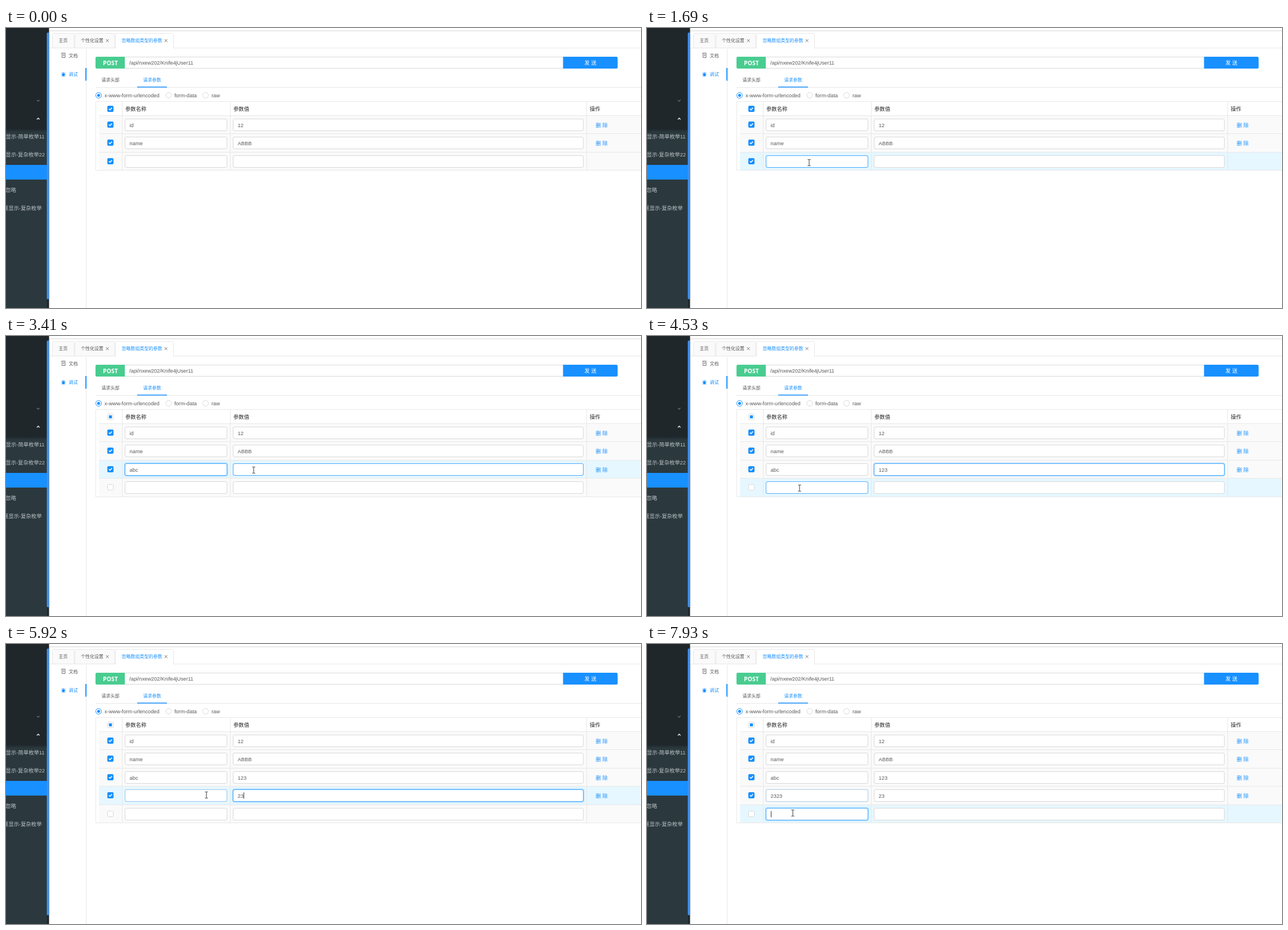
These frames come from a looping animation (1128 px wide and 497 px high, 8000 ms). An HTML page:

```html
<!DOCTYPE html>
<html lang="zh-CN">
<head>
<meta charset="utf-8">
<title>请求参数</title>
<style>
html, body { margin: 0; height: 100%; overflow: hidden; background: #fff; }
svg { display: block; width: 100vw; height: 100vh; }
text { font: 9.33px "Liberation Sans", "Noto Sans CJK SC", "Noto Sans CJK", sans-serif; fill: #595959; white-space: pre; }
.small { font-size: 8px; }
.url { font-size: 9.2px; }
.dark { fill: #262626; }
.blue { fill: #1890ff; }
.white { fill: #fff; }
.side { fill: #bcc2c4; text-anchor: end; }
.method { font: 700 10.3px "Open Sans", sans-serif; fill: #fff; text-anchor: middle; }
.rule { fill: none; stroke: #e8e8e8; }
.field { fill: #fff; stroke: #d9d9d9; }
.edge { fill: none; stroke: #40a9ff; }
.glow { fill: none; stroke: #1890ff; stroke-opacity: .25; stroke-width: 1.5; }
.tab { fill: #fafafa; stroke: #e8e8e8; }
.icon { fill: none; stroke: #666; stroke-width: .9; }
.box { fill: #fff; stroke: #d9d9d9; }
.on .box { fill: #1890ff; stroke: #1890ff; }
.tick { fill: none; stroke: #fff; stroke-width: 1.5; visibility: hidden; }
.on .tick { visibility: inherit; }
.dash { fill: #1890ff; visibility: hidden; }
.part .dash { visibility: inherit; }
</style>
</head>
<body>
<svg viewBox="0 0 1128 497" preserveAspectRatio="none">
  <defs>
    <linearGradient id="shade" x2="0" y2="1">
      <stop offset="0" stop-opacity=".35"/>
      <stop offset="1" stop-opacity="0"/>
    </linearGradient>
    <g id="check">
      <rect class="box" x="-5" y="-5" width="10" height="10" rx="1.2"/>
      <path class="tick" d="M-2.7 0 -.8 2 2.8 -2.1"/>
      <rect class="dash" x="-2.7" y="-2.7" width="5.4" height="5.4"/>
    </g>
  </defs>

  <!-- side menu -->
  <rect width="76.5" height="497" fill="#1f272b"/>
  <rect y="178" width="73" height="319" fill="#2b393f"/>
  <rect y="178" width="73" height="7" fill="url(#shade)"/>
  <rect y="243" width="73" height="26" fill="#1890ff"/>
  <rect x="72.5" y="8" width="4" height="473.5" rx="2" fill="#4091f0"/>
  <path d="M54.8 127.8l2.4 2.4 2.4-2.4" fill="none" stroke="#a0a6a8"/>
  <path d="M54.8 162.4l2.4-2.4 2.4 2.4" fill="none" stroke="#fff" stroke-width="1.3"/>
  <text class="side" x="68.5" y="196">显示-简单枚举11</text>
  <text class="side" x="69" y="228">显示-复杂枚举22</text>
  <text class="side" x="18" y="291">忽略</text>
  <text class="side" x="63.5" y="323">框显示-复杂枚举</text>

  <!-- page tabs -->
  <rect x="77" y="4" width="1051" height="2" fill="#e9e9e9"/>
  <path class="rule" d="M77 35.5H1128"/>
  <path class="tab" d="M82.5 35.5V12.5q0-3 3-3H118q3 0 3 3V35.5z"/>
  <path class="tab" d="M122.5 35.5V12.5q0-3 3-3H190q3 0 3 3V35.5z"/>
  <path d="M194.5 36V12.5q0-3 3-3H294.5q3 0 3 3V36" fill="#fff" stroke="#e8e8e8"/>
  <text class="small" x="93.5" y="25">主页</text>
  <text class="small" x="133" y="25">个性化设置</text>
  <text class="small blue" x="205.5" y="25">忽略数组类型的参数</text>
  <path class="icon" d="M177.6 19.9l5 5m0-5-5 5M281.6 19.9l5 5m0-5-5 5"/>

  <!-- doc / debug menu -->
  <path class="rule" d="M142.5 37V497"/>
  <rect x="141" y="71" width="2" height="22.5" fill="#1890ff"/>
  <path class="icon" d="M99.5 45V52.5H105V44.5H98.5M101 47H103.8M101 49H103.8"/>
  <g stroke="#1890ff" stroke-width=".9" fill="none">
    <ellipse cx="102" cy="83" rx="2" ry="2.6" fill="#1890ff"/>
    <path d="M100.3 80q1.7-3 3.4 0M98.3 82.7H105.7M98.7 79.3l1.6 1.7M105.3 79.3l-1.6 1.7M98.7 86l1.6-1.5M105.3 86l-1.6-1.5"/>
  </g>
  <text class="small" x="111.5" y="51.5">文档</text>
  <text class="small blue" x="111.5" y="85">调试</text>

  <!-- address line -->
  <rect class="field" x="200.5" y="51.5" width="800" height="20"/>
  <path d="M211 51H161.5q-2.5 0-2.5 2.5V69.5q0 2.5 2.5 2.5H211z" fill="#49cc90"/>
  <path d="M989.5 51H1084q2.5 0 2.5 2.5V69.5q0 2.5-2.5 2.5H989.5z" fill="#1890ff"/>
  <text class="method" x="185.5" y="65.5">POST</text>
  <text class="url" x="219" y="65">/api/nxew202/Knife4jUser11</text>
  <text class="white" x="1027.5" y="65">发 送</text>

  <!-- request tabs -->
  <path class="rule" d="M159 105.5H1128"/>
  <rect x="233" y="104" width="53" height="1.5" fill="#1890ff"/>
  <text class="small" x="169.5" y="95">请求头部</text>
  <text class="small blue" x="243.5" y="95">请求参数</text>

  <!-- body type -->
  <circle cx="164.5" cy="119.5" r="5" fill="#fff" stroke="#1890ff"/>
  <circle cx="164.5" cy="119.5" r="2.6" fill="#1890ff"/>
  <circle class="field" cx="289" cy="119.5" r="5"/>
  <circle class="field" cx="354.5" cy="119.5" r="5"/>
  <text class="url" x="175" y="122.5">x-www-form-urlencoded</text>
  <text x="299" y="122.5">form-data</text>
  <text x="365" y="122.5">raw</text>

  <!-- table -->
  <path class="rule" d="M1128 130.5H159.5V155.5M206.5 130V155.5M398.5 130V155.5M1031.5 130V155.5M165 155.5H1128"/>
  <g id="master" transform="translate(185.5 143.5)"></g>
  <text class="dark" x="212" y="146.5">参数名称</text>
  <text class="dark" x="404" y="146.5">参数值</text>
  <text class="dark" x="1037" y="146.5">操作</text>
  <g id="body"></g>
  <path id="foot" class="rule" d="M159 0H166"/>

  <rect id="caret" width="1" height="11" fill="#333" visibility="hidden"/>
  <path id="arrow" d="M.5 .5V11.3L3 9 4.7 12.7 6.5 11.9 4.8 8.3H8z" fill="#fff" stroke="#222" stroke-width=".9" visibility="hidden"/>
  <path id="beam" d="M-2.5 -5.5H-.6L0 -5 .6 -5.5H2.5M0 -5V5M-2.5 5.5H-.6L0 5 .6 5.5H2.5" fill="none" stroke="#333" visibility="hidden"/>
</svg>
<script>
const LOOP = 8000, FADE = 300, BLINK = 500;
const $ = id => document.getElementById(id);

// pointer path: time, x, y
const route = [
  [130, 1059, 486], [430, 850, 252], [560, 670, 206], [680, 530, 207],
  [740, 470, 226], [830, 401, 249.5], [930, 352, 240], [1020, 352, 240],
  [1650, 288, 239], [2800, 288, 239], [3100, 392, 234], [3420, 441, 238],
  [4090, 441, 238], [4500, 270.5, 270], [4900, 270.5, 270], [5380, 430, 268],
  [5780, 430, 268], [5920, 356, 268], [6240, 288, 268], [7000, 288, 268],
  [7160, 286, 289], [7320, 279, 299], [7600, 259, 300], [LOOP, 259, 300]
];

// clicks into a field: time, row, column
const clicks = [[1720, 2, 0], [3530, 2, 1], [5450, 3, 1], [6300, 3, 0], [7770, 4, 0]];

// typing: text and the time of each key
const preset = { '0,0': 'id', '0,1': '12', '1,0': 'name', '1,1': 'ABBB' };
const typed = {
  '2,0': ['abc', [2240, 2400, 2630]],
  '2,1': ['123', [3870, 3950, 4020]],
  '3,0': ['2323', [6450, 6530, 6780, 6850]],
  '3,1': ['23', [5660, 5750]]
};
const keyTimes = Object.values(typed).flatMap(k => k[1]);

const shownAt = [0, 0, 0, 2240, 5660];
const checkedAt = [0, 0, 0, 5750, Infinity];
const deleteAt = [0, 0, 2240, 5750, Infinity];

const columns = [{ x: 211.5, w: 181 }, { x: 403.5, w: 622 }];
const rowTop = i => Math.round(155 + 32.4 * i) + 0.5;

const checkShape = $('check').innerHTML;
$('master').innerHTML = checkShape;

function fieldMarkup({ x, w }, y) {
  const size = `x="${x}" y="${y}" width="${w}" height="21"`;
  return `<rect class="field" ${size} rx="2.5"/>
    <rect class="glow" x="${x - 1.2}" y="${y - 1.2}" width="${w + 2.4}" height="23.4" rx="3.5"/>
    <rect class="edge" ${size} rx="2.5"/>
    <text class="value" x="${x + 8}" y="${y + 14}"></text>`;
}

const rows = shownAt.map((_, i) => {
  const y = rowTop(i), end = rowTop(i + 1), mid = y + 16.5;
  const g = document.createElementNS('http://www.w3.org/2000/svg', 'g');
  g.innerHTML = `<rect x="165" y="${y}" width="962" height="${end - y}" fill="#fafafa"/>
    <rect class="tint" x="165" y="${y}" width="962" height="${end - y}" fill="#e6f7ff"/>
    <path class="rule" d="M159.5 ${y}V${end}M206.5 ${y}V${end}M398.5 ${y}V${end}M1031.5 ${y}V${end}M165 ${y}H1128M165 ${end}H1128"/>
    <g class="pick" transform="translate(185.5 ${mid - 0.5})">${checkShape}</g>
    ${columns.map(c => fieldMarkup(c, y + 6)).join('')}
    <text class="blue delete" x="1047.5" y="${mid + 3.5}">删 除</text>`;
  $('body').append(g);
  const all = s => [...g.querySelectorAll(s)];
  return {
    g, tint: all('.tint')[0], pick: all('.pick')[0], del: all('.delete')[0],
    edges: all('.edge'), glows: all('.glow'), values: all('.value')
  };
});

function pointer(t) {
  if (t < route[0][0]) return null;
  const n = route.findIndex(p => p[0] > t);
  const [t0, x0, y0] = route[n - 1], [t1, x1, y1] = route[n];
  const u = (t - t0) / (t1 - t0);
  return { x: x0 + (x1 - x0) * u, y: y0 + (y1 - y0) * u };
}

const focusAt = t => clicks.filter(c => c[0] <= t).pop();

// what is hovered and focused at a moment
function stateAt(t) {
  const p = pointer(t), f = focusAt(t);
  const s = { p, row: -1, col: -1, focus: f ? f[1] + ',' + f[2] : '' };
  if (!p) return s;
  s.row = rows.findIndex((_, i) => t >= shownAt[i] && p.y >= rowTop(i) && p.y < rowTop(i + 1));
  if (s.row >= 0) {
    const dy = p.y - rowTop(s.row);
    if (dy > 5.5 && dy < 27.5) s.col = columns.findIndex(c => p.x >= c.x && p.x <= c.x + c.w);
  }
  return s;
}

// recent moments, newest weighing most, give the eased fades
function recent(t) {
  const n = 20;
  return Array.from({ length: n }, (_, k) => ({
    ...stateAt(t - (k + 0.5) * FADE / n),
    weight: 2 * (1 - (k + 0.5) / n) / n
  }));
}

const show = (el, on) => el.setAttribute('visibility', on ? 'inherit' : 'hidden');

function textAt(id, t) {
  if (!typed[id]) return preset[id] || '';
  const [text, times] = typed[id];
  return text.slice(0, times.filter(k => k <= t).length);
}

function drawCaret(t) {
  const f = focusAt(t);
  const acts = [...keyTimes, ...clicks.map(c => c[0])].filter(k => k <= t);
  const lit = f && Math.floor((t - Math.max(...acts)) / BLINK) % 2 === 0;
  show($('caret'), lit);
  if (!lit) return;
  const [, row, col] = f;
  const label = rows[row].values[col];
  const width = label.textContent ? label.getComputedTextLength() : 0;
  $('caret').setAttribute('x', Math.round(columns[col].x + 8 + width));
  $('caret').setAttribute('y', rowTop(row) + 11);
}

function drawPointer({ p, col }) {
  show($('arrow'), p && col < 0);
  show($('beam'), p && col >= 0);
  if (!p) return;
  const place = `translate(${Math.round(p.x)} ${Math.round(p.y)})`;
  $('arrow').setAttribute('transform', place);
  $('beam').setAttribute('transform', place);
}

function draw(t) {
  const past = recent(t);
  const fade = test => past.reduce((sum, s) => sum + (test(s) ? s.weight : 0), 0);

  rows.forEach((r, i) => {
    show(r.g, t >= shownAt[i]);
    r.tint.setAttribute('opacity', fade(s => s.row === i));
    r.pick.setAttribute('class', t >= checkedAt[i] ? 'pick on' : 'pick');
    show(r.del, t >= deleteAt[i]);
    columns.forEach((_, c) => {
      const id = i + ',' + c;
      const text = textAt(id, t);
      if (r.values[c].textContent !== text) r.values[c].textContent = text;
      r.edges[c].setAttribute('opacity', fade(s => s.focus === id || (s.row === i && s.col === c)));
      r.glows[c].setAttribute('opacity', fade(s => s.focus === id));
    });
  });

  $('master').setAttribute('class', t < shownAt[3] ? 'on' : 'part');
  const count = shownAt.filter(s => t >= s).length;
  $('foot').setAttribute('transform', `translate(0 ${rowTop(count)})`);
  drawCaret(t);
  drawPointer(stateAt(t));
}

const began = performance.now();
function tick() {
  draw(Math.max(0, performance.now() - began) % LOOP);
  requestAnimationFrame(tick);
}
tick();
</script>
</body>
</html>
```
